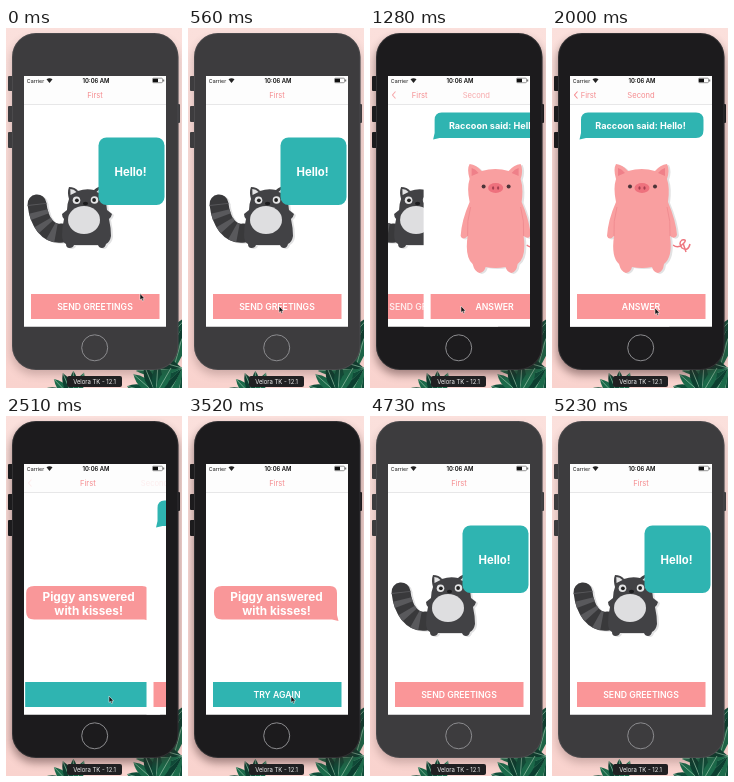
These frames come from a looping animation (176 px wide and 360 px high, 5260 ms). An HTML page:

```html
<!DOCTYPE html>
<html lang="en">
<head>
<meta charset="utf-8">
<title>Greeting app</title>
<style>
  html, body { margin: 0; width: 100%; height: 100%; overflow: hidden; background: #fbdcd8; }
  svg { display: block; width: 100vw; height: 100vh; }
  text { font-family: Inter, Roboto, sans-serif; text-anchor: middle; }
  .btn { font-size: 8.7px; font-weight: 600; fill: #fff; }
  .msg { font-weight: 700; fill: #fff; }
  .nav { font-size: 7.6px; fill: #f58d90; }
  .cut { filter: drop-shadow(2px 1px 0 #e2e2e3); }
  #shade { filter: blur(4px); }
</style>
</head>
<body>
<svg viewBox="0 0 176 360">
  <defs>
    <clipPath id="screen"><rect x="18" y="48" width="142" height="250.500"/></clipPath>
    <linearGradient id="wall" x2="0" y2="1">
      <stop offset="0" stop-color="#fbe0dc"/><stop offset="1" stop-color="#f9d3ce"/>
    </linearGradient>
  </defs>

  <rect width="176" height="360" fill="url(#wall)"/>
  <g id="leaves"></g>

  <!-- handset -->
  <rect id="shade" x="5" y="10" width="168" height="337" rx="24" fill="#3a2020"/>
  <g id="body">
    <rect x="2" y="48" width="5" height="15" rx="1"/>
    <rect x="2" y="78" width="5" height="16" rx="1"/>
    <rect x="2" y="104" width="5" height="16" rx="1"/>
    <rect x="170" y="76" width="4" height="19" rx="1"/>
    <rect x="6" y="5" width="166.500" height="337" rx="24"/>
  </g>
  <rect x="6.500" y="5.500" width="165.500" height="336" rx="23.500" fill="none" stroke="#77777a" stroke-opacity=".35" stroke-width=".7"/>
  <circle cx="88.700" cy="319.800" r="13" fill="none" stroke="#8b8b8e" stroke-width="1"/>
  <rect x="61" y="348" width="55" height="11" rx="2" fill="#202022"/>
  <text x="88.500" y="355.700" font-size="5.9" fill="#f2f2f2">Velora TK - 12.1</text>

  <g clip-path="url(#screen)">
    <rect x="18" y="48" width="142" height="251" fill="#fff"/>

    <g id="first">
      <rect x="18" y="77" width="142" height="222" fill="#fff"/>
      <g id="hello">
        <g class="cut">
          <path d="M56 205C42 207 33 194 31 176" fill="none" stroke="#39393b" stroke-width="19" stroke-linecap="round"/>
          <path d="M56 205C42 207 33 194 31 176" fill="none" stroke="#59595c" stroke-width="19" stroke-dasharray="5.500 6.500" stroke-dashoffset="-6"/>
          <path d="M63 171Q61 164 63 159Q69 159 72 163Q80 160 88 162Q92 158 98 158Q100 164 98 170Q101 176 101 182L106 186Q105 190 103 191Q105 200 105 208Q104 214 100 216Q99 220 96 220Q93 220 92 217H68Q67 220 63.500 220Q60 220 60 216Q56 214 56 207Q56 199 58 191Q56 189 56 186L61 182Q61 176 63 171Z" fill="#424245"/>
        </g>
        <path d="M64.500 167L64.300 161Q68 161 70.500 164ZM90.500 164Q93 160.500 96.700 160L96 166Z" fill="#e4e4e5"/>
        <circle cx="70.500" cy="172.300" r="3.800" fill="#e4e4e5"/><circle cx="88.500" cy="172" r="3.800" fill="#e4e4e5"/>
        <circle cx="70.900" cy="172.300" r="1.900" fill="#222"/><circle cx="88.100" cy="172" r="1.900" fill="#222"/>
        <ellipse cx="79.500" cy="175.500" rx="2.600" ry="1.800" fill="#1c1c1e"/>
        <ellipse cx="78" cy="192" rx="16" ry="14" fill="#dedee0"/>
        <rect x="92.500" y="109.500" width="66" height="67.500" rx="8" fill="#2fb4b1"/>
        <text class="msg" x="124.500" y="147.500" font-size="11.3">Hello!</text>
      </g>
      <g id="reply">
        <path d="M34 170H142Q149 170 149 177V199L150.500 205L144 203.500H34Q26 203.500 26 196V177Q26 170 34 170Z" fill="#f99799"/>
        <text class="msg" x="88.500" y="184.500" font-size="11.8">Piggy answered</text>
        <text class="msg" x="88.500" y="198.500" font-size="11.8">with kisses!</text>
      </g>
      <rect id="firstBtn" x="25" y="266" width="128.500" height="25"/>
      <text id="firstLabel" class="btn" x="89" y="282.300"></text>
    </g>

    <g id="second">
      <rect x="18" y="77" width="142" height="222" fill="#fff"/>
      <path d="M36 84.500H144Q151.500 84.500 151.500 92V102Q151.500 110 144 110H34L27.500 111.500L29 105V92Q29 84.500 36 84.500Z" fill="#2fb4b1"/>
      <text class="msg" x="88.500" y="100.700" font-size="9.1">Raccoon said: Hello!</text>
      <path d="M121 217Q126 221 131 216Q136 211 130 212Q126 215 130 220Q136 224 138 216M131 215L134 224" fill="none" stroke="#ee777f" stroke-width="1.500"/>
      <g class="cut">
        <path d="M64 151Q61 141 64 136Q71 137 76 143Q90 139 103 143Q108 137 115 136Q118 142 115 151Q118 160 116 174Q124 193 125 207Q123 212 118 208Q121 229 112 236Q111 244 106 245Q101 244 100 239Q90 241 80 239Q79 244 74 245Q69 244 67 236Q59 229 62 208Q57 213 55 208Q56 192 64 174Q61 160 64 151Z" fill="#f99fa0"/>
      </g>
      <path d="M66 148L66 140Q70 141 73 145ZM106 145Q109 141 113 140L113 148Z" fill="#ef8089"/>
      <path d="M65 179Q61 193 62 208M115 179Q119 193 118 208" fill="none" stroke="#ee888d" stroke-width=".8"/>
      <ellipse cx="90" cy="160" rx="7.500" ry="5" fill="#ee717d"/>
      <ellipse cx="87.500" cy="160" rx="1.100" ry="1.700" fill="#a63f50"/><ellipse cx="92.500" cy="160" rx="1.100" ry="1.700" fill="#a63f50"/>
      <circle cx="78" cy="158.500" r="2" fill="#4b3438"/><circle cx="103" cy="158.500" r="2" fill="#4b3438"/>
      <rect x="25" y="266" width="128.500" height="25" fill="#fa9698"/>
      <text id="secondLabel" class="btn" x="89" y="282.300">ANSWER</text>
    </g>

    <!-- status and navigation bars -->
    <rect x="18" y="48" width="142" height="28.500" fill="#fdfdfd"/>
    <path d="M18 76.500H160" stroke="#dedee0" stroke-width=".7"/>
    <text x="29.500" y="54.700" font-size="5.3" fill="#111">Carrier</text>
    <path d="M40.500 51.300Q43.500 49 46.500 51.300L43.500 55Z" fill="#222"/>
    <text x="90" y="54.900" font-size="5.9" font-weight="600" fill="#111">10:06 AM</text>
    <rect x="146.500" y="50.200" width="10" height="4.500" rx="1" fill="none" stroke="#555" stroke-width=".6"/>
    <rect x="147" y="50.700" width="5" height="3.500" fill="#111"/>
    <rect x="157.200" y="51.500" width="1" height="2" fill="#555"/>
    <path id="back" d="M25.500 63.500L22.500 67L25.500 70.500" fill="none" stroke="#f58d90" stroke-width="1.100"/>
    <text id="firstTitle" class="nav" y="69.700">First</text>
    <text id="secondTitle" class="nav" y="69.700">Second</text>
  </g>

  <path id="cursor" d="M0 0V6.500L1.500 5.200L2.600 7.600L3.700 7.100L2.700 4.900H4.600Z" fill="#111" stroke="#fff" stroke-width=".5"/>
</svg>

<script>
const LOOP = 5260, STEP = 71.6, WIDTH = 142;
const PUSH = 1070, POP = 2315, RESET = 3760;
const PINK = '#fa9698', TEAL = '#2fb4b1';

const easeOut = p => 1 - (1 - p) ** 3;
const easeIn = p => p ** 3;
const smooth = p => p * p * (3 - 2 * p);
// Pointer moves: start, end, from, to, easing.
const MOVES = [
  [0, 560, [134, 265.5], [91, 278], easeOut],
  [1250, 1900, [91, 278], [103, 280], smooth],
  [3940, 4400, [103, 280], [177, 164], easeIn]
];

const $ = id => document.getElementById(id);
const set = (id, attrs) => {
  for (const key in attrs) $(id).setAttribute(key, attrs[key]);
};
const clamp = v => Math.min(1, Math.max(0, v));
const lerp = (a, b, p) => a + (b - a) * p;

// A leaf is two mirrored curves around a pale midrib.
function leaf(x, y, length, width, angle, color) {
  return `<g transform="translate(${x} ${y}) rotate(${angle})">
    <path d="M0 0Q${length * .55} ${-width} ${length} 0Q${length * .55} ${width} 0 0Z" fill="${color}"/>
    <path d="M0 0H${length}" stroke="#8dbda2" stroke-width=".7"/></g>`;
}

function fan(x, y, count, from, to, length, width) {
  const greens = ['#0f4d39', '#1b6a4a', '#0c3f30'];
  return Array.from({ length: count }, (_, i) =>
    leaf(x, y, length, width, lerp(from, to, i / (count - 1)), greens[i % 3])).join('');
}
$('leaves').innerHTML =
  fan(182, 288, 4, 92, 132, 56, 11) +
  fan(176, 340, 6, 98, 196, 46, 13) +
  fan(150, 366, 5, 195, 300, 30, 10) +
  fan(68, 372, 5, 205, 290, 29, 9);

// Critically damped spring, as used by page transitions.
function spring(ms) {
  if (ms <= 0) return 0;
  if (ms > 600) return 1;
  const k = ms * .01826;
  return 1 - (1 + k) * Math.exp(-k);
}

function pointer(t) {
  const [start, end, from, to, ease] = MOVES.filter(m => m[0] <= t).pop();
  const p = ease(clamp((t - start) / (end - start)));
  return [lerp(from[0], to[0], p), lerp(from[1], to[1], p)];
}

// Label opacity around a press between two times.
const pressed = (t, down, up) =>
  1 - .78 * clamp((t - down) / 50) * (1 - clamp((t - up) / 220));

function render(t) {
  const p = spring(t - PUSH) - spring(t - POP);
  const answered = t >= POP && t < RESET;
  const focused = t >= 860 && t < 4505;

  set('body', { fill: focused ? '#1c1b1d' : '#3d3c3e' });
  set('shade', { opacity: focused ? .45 : .22 });
  set('first', { transform: `translate(${-.3 * WIDTH * p} 0)` });
  set('second', { transform: `translate(${WIDTH * (1 - p)} 0)` });
  set('hello', { display: answered ? 'none' : 'inline' });
  set('reply', { display: answered ? 'inline' : 'none' });
  set('firstBtn', { fill: answered ? TEAL : PINK });
  $('firstLabel').textContent = answered ? 'TRY AGAIN' : 'SEND GREETINGS';
  set('firstLabel', {
    opacity: answered
      ? clamp((t - 2520) / 200) * pressed(t, 3640, RESET)
      : pressed(t, 930, PUSH - 20) * pressed(t, 3640, RESET)
  });
  set('secondLabel', { opacity: pressed(t, 2170, POP - 20) });
  set('firstTitle', { x: lerp(89, 36.5, p) });
  set('secondTitle', { x: lerp(158, 89, p), opacity: p });
  set('back', { opacity: p });

  set('cursor', {
    display: t < 4400 ? 'inline' : 'none',
    transform: `translate(${pointer(t).join(' ')})`
  });
}

const start = performance.now();
function tick() {
  const t = (performance.now() - start) % LOOP;
  render(Math.floor((t + 5) / STEP) * STEP);
  requestAnimationFrame(tick);
}
tick();
</script>
</body>
</html>
```
